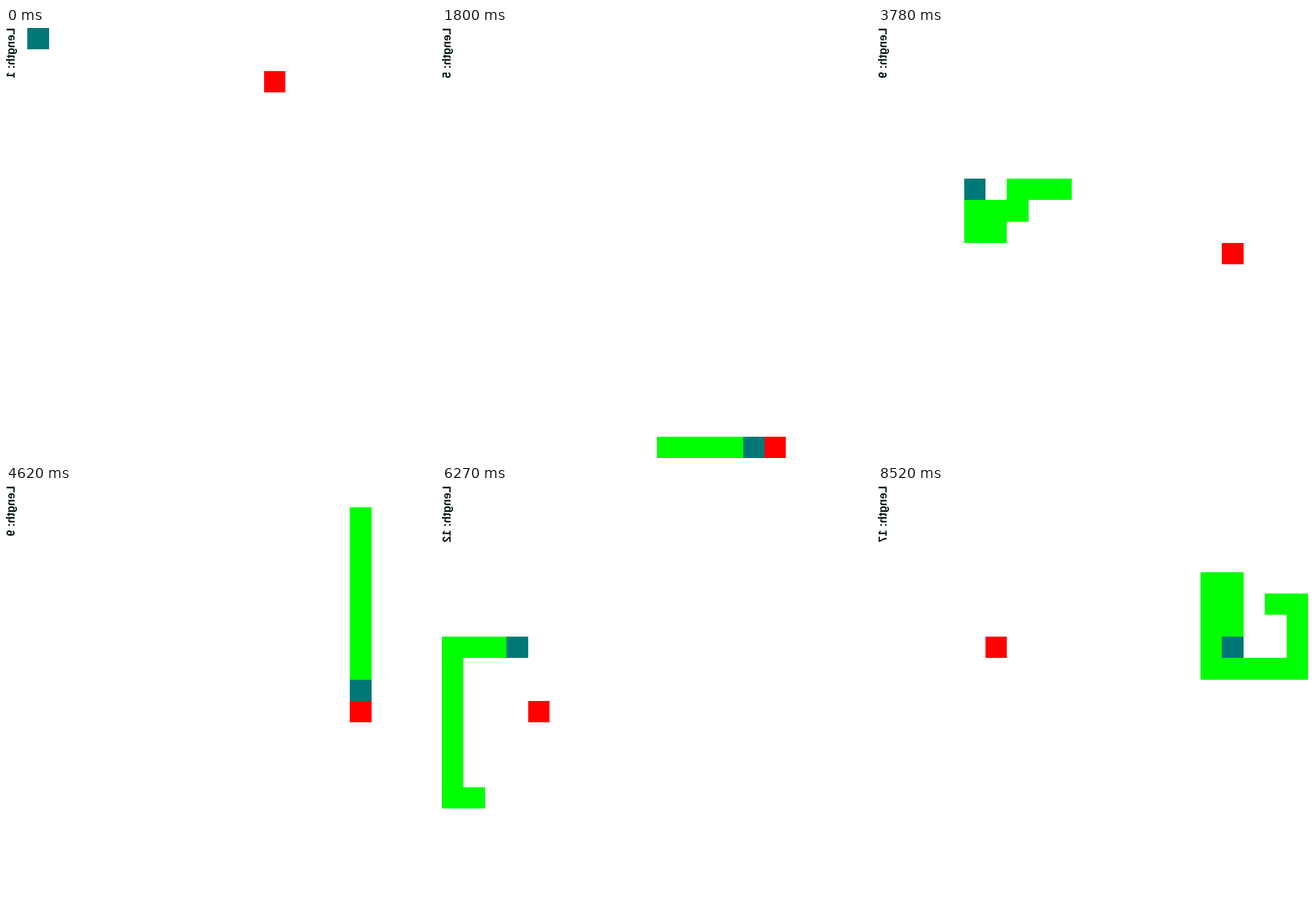
Animation of 748 by 748 pixels, one loop 8580 ms. Source, as an HTML page with a canvas:

```html
<!DOCTYPE html>
<html lang="en">
<head>
<meta charset="utf-8">
<title>Snake</title>
<style>
  html, body { margin: 0; width: 100%; height: 100%; overflow: hidden; background: #fff; }
  canvas { display: block; }
</style>
</head>
<body>
<canvas id="stage" width="748" height="748"></canvas>
<script>
const SIZE = 748, CELL = SIZE / 20, STEP = 30, LOOP = 8580;
const ctx = document.getElementById('stage').getContext('2d');

// Runs of moves: direction and number of cells
const MOVES = `R11 D2 L9 U2 R3 D7 L3 D12 R12 U12 L6 U4 R5 D6 L4 U8 R2 D6 L6
  D1 L1 D1 L1 U9 R12 D10 L1 U10 R2 D10 L11 D4 L6 U7 R4 D3 R2 U6 L1 U1
  R2 D7 R1 U3 R1 D3 R4 U6 L2 U4 R7 D5 R1 D3 L4 U4 R1 D3`;
const DIRS = { R: [1, 0], L: [-1, 0], U: [0, -1], D: [0, 1] };
const FOODS = [
  [12, 2], [3, 0], [6, 0], [3, 7], [15, 19], [14, 9], [12, 1], [4, 9], [16, 10],
  [17, 0], [6, 14], [4, 10], [7, 10], [9, 10], [11, 0], [19, 8], [5, 7]
];

const path = [[1, 0]];
for (const run of MOVES.split(/\s+/)) {
  const [dx, dy] = DIRS[run[0]];
  for (let n = +run.slice(1); n > 0; n--) {
    const [x, y] = path[path.length - 1];
    path.push([x + dx, y + dy]);
  }
}

// Number of foods eaten after each step
let count = 0;
const eaten = path.map(([x, y]) => {
  const [fx, fy] = FOODS[count];
  if (x === fx && y === fy) count++;
  return count;
});

function fillCell([x, y], color) {
  const left = Math.round(x * CELL), top = Math.round(y * CELL);
  ctx.fillStyle = color;
  ctx.fillRect(left, top, Math.round((x + 1) * CELL) - left, Math.round((y + 1) * CELL) - top);
}

function drawLabel(length) {
  ctx.setTransform(0, 1, 1, 0, 0, 0); // swap the axes
  ctx.font = 'bold 19.4px "Liberation Sans", Arial, sans-serif';
  ctx.fillStyle = '#001414';
  ctx.fillText('Length: ' + length, 0, 15);
  ctx.setTransform(1, 0, 0, 1, 0, 0);
}

function draw(step) {
  const length = eaten[step] + 1;
  ctx.fillStyle = '#fff';
  ctx.fillRect(0, 0, SIZE, SIZE);
  for (let i = Math.max(0, step - length + 1); i < step; i++) fillCell(path[i], '#0f0');
  fillCell(path[step], '#007878');
  fillCell(FOODS[eaten[step]], '#f00');
  drawLabel(length);
}

let start = null;
function tick(now) {
  if (start === null) start = now;
  const time = (now - start) % LOOP;
  draw(Math.min(path.length - 1, Math.floor(time / STEP)));
  requestAnimationFrame(tick);
}
draw(0);
requestAnimationFrame(tick);
</script>
</body>
</html>
```
